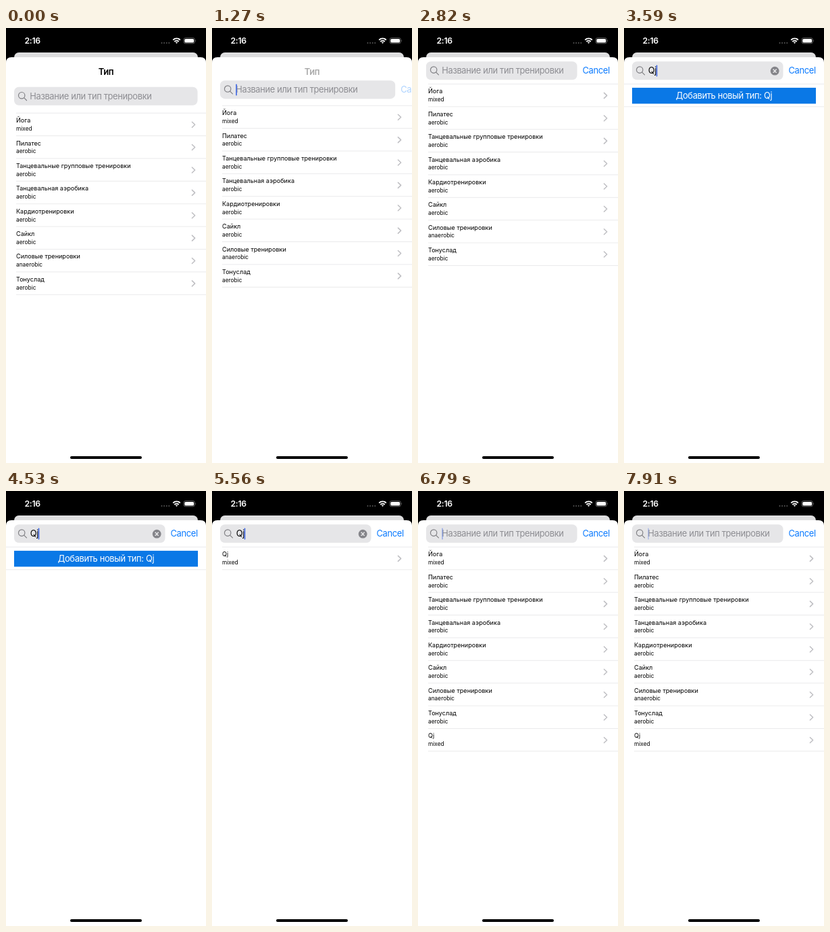
These frames come from a looping animation (296x640 px, 8 s). An HTML page:

```html
<!DOCTYPE html>
<html lang="ru">
<head>
<meta charset="utf-8">
<style>
  html, body { margin: 0; width: 100%; height: 100%; overflow: hidden; background: #000; }
  svg { display: block; width: 296px; height: 640px; }
  text { font: 12.9px Inter, Roboto, sans-serif; letter-spacing: -.35px; white-space: pre; }
  .mid { text-anchor: middle; }
  .bold { font-weight: 600; }
  .name { font-size: 9.1px; letter-spacing: 0; }
  .sub { font-size: 8.35px; letter-spacing: 0; }
  .line { stroke: #dcdcde; stroke-width: .6; }
  .chevron { fill: none; stroke: #bfbfc3; stroke-width: 1.5; stroke-linecap: round; stroke-linejoin: round; }
</style>
</head>
<body>
<svg viewBox="0 0 296 640">
  <rect width="296" height="640"/>
  <text class="bold" x="27.5" y="23" fill="#fff" style="font-size:12.3px">2:16</text>
  <path d="M230.5 22h11" stroke="#555" stroke-width="2" stroke-linecap="round" stroke-dasharray="0 3.6"/>
  <g fill="none" stroke="#fff" stroke-width="1.9">
    <path d="M247.2 17.6a7.5 7.5 0 0 1 10.6 0M249.3 20a4.6 4.6 0 0 1 6.4 0"/>
    <path d="M250.9 21.3a2.3 2.3 0 0 1 3.2 0l-1.6 1.7z" fill="#fff" stroke="none"/>
  </g>
  <rect x="263" y="14.6" width="16.4" height="8.2" rx="2.6" fill="none" stroke="#777" stroke-width=".8"/>
  <rect x="264.3" y="15.9" width="13.8" height="5.6" rx="1.6" fill="#fff"/>
  <path d="M280.6 17.4q1.3 1.3 0 2.6z" fill="#888"/>

  <rect x="12" y="36" width="272" height="30" rx="7" fill="#dededf"/>
  <path d="M0 640V51q0-8 8-8H288q8 0 8 8V640z" fill="#fff"/>
  <rect x="95" y="630" width="106" height="4" rx="2"/>

  <text id="title" class="mid bold" x="148" y="69">Тип</text>
  <g id="search">
    <rect id="field" x="12" y="0" height="27" rx="7" fill="#e6e6e8"/>
    <g fill="none" stroke="#818185" stroke-width="1.2" stroke-linecap="round">
      <circle cx="23.2" cy="12.4" r="4.7"/><path d="M26.7 15.9l3.8 3.8"/>
    </g>
    <text id="hint" x="35.3" y="18.2" fill="#8e8e93">Название или тип тренировки</text>
    <text id="query" x="35.7" y="18.2"></text>
    <g id="clear">
      <circle cx="223.2" cy="14" r="6.4" fill="#85858a"/>
      <path d="M221 11.8l4.4 4.4m0-4.4l-4.4 4.4" stroke="#fff" stroke-width="1.1" stroke-linecap="round"/>
    </g>
    <rect id="caret" y="5.3" width="1.6" height="17" rx=".8" fill="#3d66e4"/>
    <text id="cancel" y="18" fill="#0a7aff">Cancel</text>
  </g>
  <g id="list"></g>
</svg>
<script>
const LOOP = 8000, PITCH = 33.38;
const el = id => document.getElementById(id);

const workouts = [
  ['Йога', 'mixed'], ['Пилатес', 'aerobic'],
  ['Танцевальные групповые тренировки', 'aerobic'],
  ['Танцевальная аэробика', 'aerobic'], ['Кардиотренировки', 'aerobic'],
  ['Сайкл', 'aerobic'], ['Силовые тренировки', 'anaerobic'], ['Тонуслад', 'aerobic']
];
const added = ['Qj', 'mixed'];

// [time, value] steps: each value holds until the next time
const focusSteps = [[0, 0], [1050, .01], [1160, .06], [1270, .256], [1380, .8], [1480, 1]];
const querySteps = [[0, ''], [3480, 'Q'], [3590, 'Qj'], [6090, 'Q'], [6790, '']];
const caretSteps = [[0, 0], [1160, 1], [1680, .45], [1800, 0], [2040, .55], [2160, 1],
  [2700, .45], [2820, 0], [3060, .55], [3180, 1], [4050, .45], [4170, 0], [4410, .55], [4530, 1],
  [5080, .45], [5200, 0], [5440, .55], [5560, 1], [6790, .45], [6890, 0], [7130, .55], [7250, 1],
  [7790, .6], [7910, .3]];
const at = (steps, t) => steps.findLast(s => s[0] <= t)[1];

const line = (y, x = 15) => `<path class="line" d="M${x} ${y}H296"/>`;

function row([name, kind], i) {
  const y = i * PITCH;
  return `<text class="name" x="15" y="${y + 14}">${name}</text>
    <text class="sub" x="15" y="${y + 25.8}">${kind}</text>
    <path class="chevron" d="M275.4 ${y + 13}l4.2 4 -4.2 4"/>` + line(y + PITCH);
}

function addButton(query, i) {
  const y = i * PITCH;
  return `<rect x="12" y="${y + 5.5}" width="272" height="23.5" fill="#0a78e6"/>
    <text class="mid" x="148" y="${y + 22}" fill="#fff">Добавить новый тип: ${query}</text>` + line(y + PITCH, 0);
}

function listMarkup(query, hasAdded) {
  const all = hasAdded ? [...workouts, added] : workouts;
  const found = all.filter(w => w[0].includes(query));
  const exact = !query || found.some(w => w[0] === query);
  return line(0, found.length ? 15 : 0) + found.map(row).join('') + (exact ? '' : addButton(query, found.length));
}

let shown;
function render(t) {
  const p = at(focusSteps, t), query = at(querySteps, t), hasAdded = t >= 4900;
  el('title').setAttribute('opacity', Math.max(0, 1 - 2.6 * p));
  el('search').setAttribute('transform', `translate(0 ${86.8 - 37.6 * p})`);
  el('field').setAttribute('width', 271.5 - 48 * p);
  el('cancel').setAttribute('x', 291.5 - 48 * p);
  el('cancel').setAttribute('opacity', Math.min(1, 1.3 * p));
  el('list').setAttribute('transform', `translate(0 ${125.2 - 42.8 * p})`);
  el('hint').style.display = query ? 'none' : '';
  el('clear').style.display = query ? '' : 'none';
  el('query').textContent = query;
  el('caret').setAttribute('x', { '': 35.3, Q: 44.7, Qj: 47.7 }[query]);
  el('caret').setAttribute('opacity', at(caretSteps, t));
  const key = query + hasAdded;
  if (key !== shown) el('list').innerHTML = listMarkup(query, hasAdded);
  shown = key;
}

const start = performance.now();
function frame() {
  render((performance.now() - start) % LOOP);
  requestAnimationFrame(frame);
}
frame();
</script>
</body>
</html>
```
